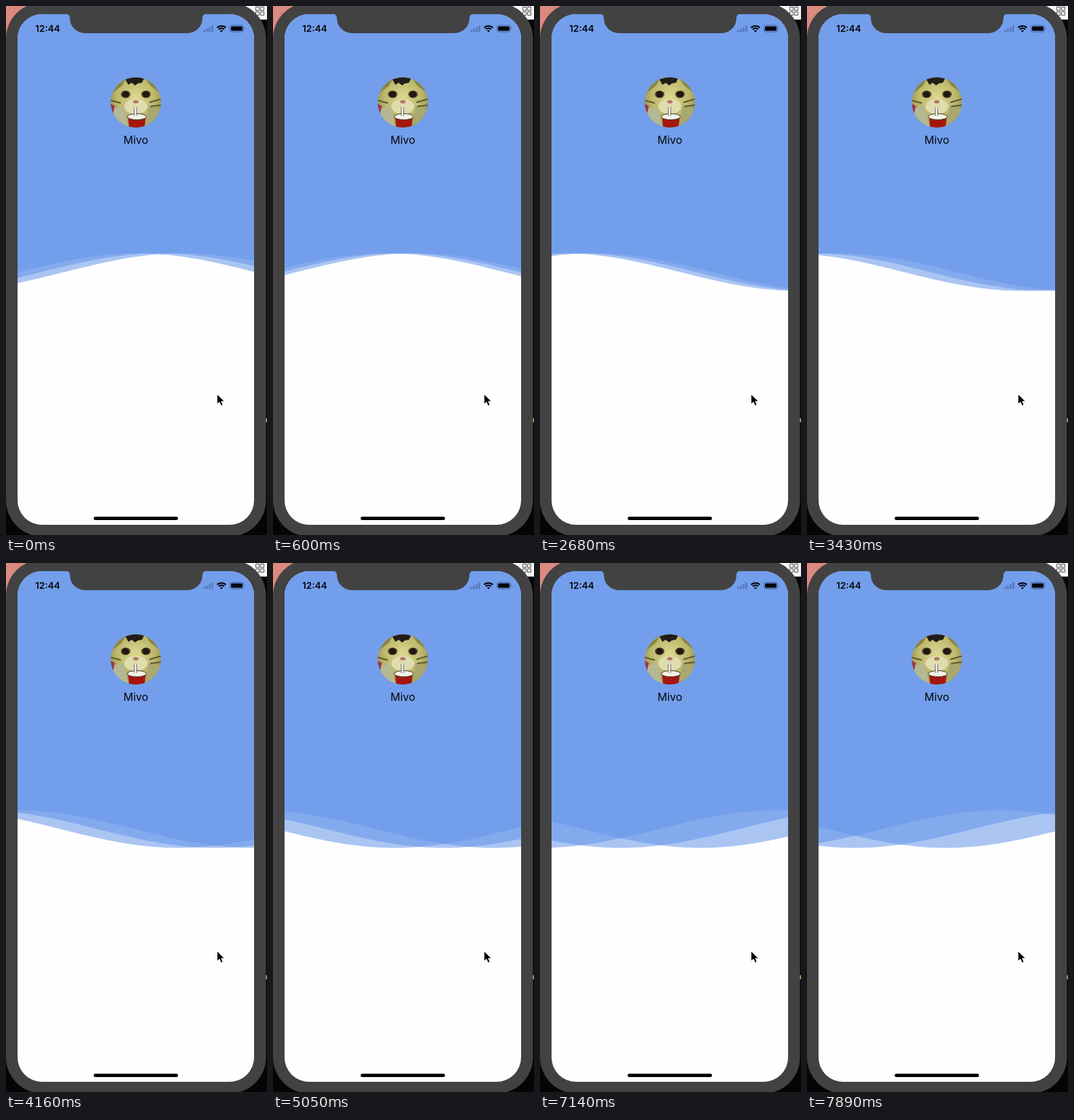
Animation of 384x779 px, one loop 8 s. Source, as an HTML page:

```html
<!DOCTYPE html>
<html lang="en">
<head>
<meta charset="utf-8">
<title>Profile waves</title>
<style>
  html, body { margin: 0; width: 100%; height: 100%; overflow: hidden; background: #000; }
  svg { display: block; width: 100vw; height: 100vh; }
  text { font-family: Inter, Roboto, sans-serif; fill: #050608; }
</style>
</head>
<body>
<svg viewBox="0 0 384 779" preserveAspectRatio="none">
  <defs>
    <clipPath id="screen"><rect x="17" y="12" width="348" height="752" rx="36"/></clipPath>
    <clipPath id="avatar"><circle cx="191" cy="142" r="37"/></clipPath>
    <radialGradient id="fur" cx=".5" cy=".4" r=".62">
      <stop offset="0" stop-color="#dcd890"/>
      <stop offset=".6" stop-color="#bcb86c"/>
      <stop offset="1" stop-color="#88864a"/>
    </radialGradient>
  </defs>

  <!-- desktop behind the phone -->
  <rect width="384" height="779" fill="#050505"/>
  <rect width="60" height="60" fill="#da8a7e"/>
  <rect x="330" width="54" height="20" fill="#f7f7f7"/>
  <rect x="382" y="607" width="2" height="6" fill="#b9ad52"/>

  <rect y="-5" width="382.500" height="786" rx="53" fill="#424242"/>
  <path d="M367.500 1.500h5v5h-5zM374.500 1.500h5v5h-5zM367.500 8.500h5v5h-5zM374.500 8.500h5v5h-5z" fill="none" stroke="#555"/>

  <g clip-path="url(#screen)">
    <rect x="17" y="12" width="348" height="752" fill="#fefefe"/>
    <g id="waves" fill="#6293ea" fill-opacity=".53"></g>
  </g>

  <path d="M88 11.500Q94 12 94 18A22 22 0 0 0 116 40H267A22 22 0 0 0 289 18Q289 12 295 11.500Z" fill="#424242"/>

  <!-- status bar -->
  <text x="61.300" y="38" font-size="13.600" font-weight="600" text-anchor="middle">12:44</text>
  <g fill="#5a7ec2">
    <rect x="290" y="35" width="3" height="3.500" rx=".7"/>
    <rect x="294" y="33" width="3" height="5.500" rx=".7"/>
    <rect x="298" y="31" width="3" height="7.500" rx=".7"/>
    <rect x="302" y="28.500" width="3" height="10" rx=".7"/>
  </g>
  <g fill="none" stroke="#050608" stroke-width="2.200">
    <path d="M310.600 31.900A9.200 9.200 0 0 1 323.400 31.900"/>
    <path d="M313 34.400A5.700 5.700 0 0 1 321 34.400"/>
  </g>
  <path d="M317 38.700L314.900 36.300Q317 34.700 319.100 36.300Z" fill="#050608"/>
  <rect x="329.500" y="28.500" width="20" height="9.600" rx="2.800" fill="none" stroke="#405f9c"/>
  <rect x="331" y="30" width="17" height="6.600" rx="1.500" fill="#050608"/>
  <path d="M351 31.500q1.300 1.700 0 3.400z" fill="#405f9c"/>

  <!-- avatar -->
  <g clip-path="url(#avatar)">
    <rect x="154" y="105" width="74" height="74" fill="url(#fur)"/>
    <path d="M154 105h24l-8 13-16 12zM228 105h-24l8 12 16 12z" fill="#8a8540"/>
    <path d="M174 105h30l-4 8-6 1-4 3-5-4-5 3z" fill="#221d18"/>
    <path d="M154 152l18-4 9 31h-27z" fill="#b4b894"/>
    <path d="M228 152l-18-4-6 31h24z" fill="#a9a870"/>
    <path d="M154 144l6 3-2 10-4 2z" fill="#9a3550"/>
    <path d="M228 137l-17 5M228 146l-16 2M154 139l15 4" stroke="#5c542f" stroke-width="2"/>
    <ellipse cx="191" cy="148" rx="17" ry="11" fill="#dfdcae"/>
    <ellipse cx="176" cy="130" rx="7" ry="5.500" fill="#5a4526"/>
    <ellipse cx="206" cy="130" rx="7" ry="5.500" fill="#5a4526"/>
    <ellipse cx="176" cy="130" rx="5" ry="4.500" fill="#1f1714"/>
    <ellipse cx="206" cy="130" rx="5" ry="4.500" fill="#1f1714"/>
    <ellipse cx="191" cy="141" rx="4" ry="2.500" fill="#b27862"/>
    <path d="M179.500 164h26l-2 15h-22z" fill="#a5160f"/>
    <ellipse cx="192.500" cy="163" rx="14" ry="4.500" fill="#f4f3e6" stroke="#37352a"/>
    <path d="M190.500 149v13" stroke="#37352a" stroke-width="4"/>
    <path d="M190.500 149v13" stroke="#fafafa" stroke-width="2.500"/>
  </g>
  <text x="191" y="203" font-size="16" text-anchor="middle">Mivo</text>

  <rect x="129" y="752" width="124" height="5" rx="2.500" fill="#000"/>
  <path d="M310.500 571.500v15l3.500-3.200 2.400 5.400 2.800-1.200-2.300-5.300h4.600z" fill="#000" stroke="#fff" stroke-width="1"/>
</svg>
<script>
const LEFT = 17, RIGHT = 365, TOP = 12;
const MID = 391.8, AMP = 27.7, K = Math.PI / (RIGHT - LEFT);
const LOOP = 8000, MEET = 1600, MEET_X = 124, SPEED = 0.02127;

const waves = [4, 3, 2].map(rate => {
  const el = document.createElementNS("http://www.w3.org/2000/svg", "path");
  document.getElementById("waves").append(el);
  return { el, rate };
});

// The picture advances in ticks of 150 ms, a few of them 140 ms.
const shortTicks = new Set([9, 17, 25, 27, 30, 34]);
const ticks = [];
for (let t = 0, i = 0; t < LOOP; i++) {
  ticks.push(t);
  t += shortTicks.has(i) ? 140 : 150;
}

function wavePath(crest) {
  let d = `M${LEFT} ${TOP}`;
  for (let x = LEFT; x <= RIGHT; x += 4) {
    d += `L${x} ${(MID - AMP * Math.cos(K * (x - crest))).toFixed(2)}`;
  }
  return d + `V${TOP}Z`;
}

function draw(t) {
  for (const { el, rate } of waves) {
    el.setAttribute("d", wavePath(MEET_X + rate * SPEED * (MEET - t)));
  }
}

const start = performance.now();
let shown = -1;
function loop() {
  const now = (performance.now() - start) % LOOP;
  const t = ticks.findLast(tick => tick <= now);
  if (t !== shown) draw(shown = t);
  requestAnimationFrame(loop);
}
loop();
</script>
</body>
</html>
```
